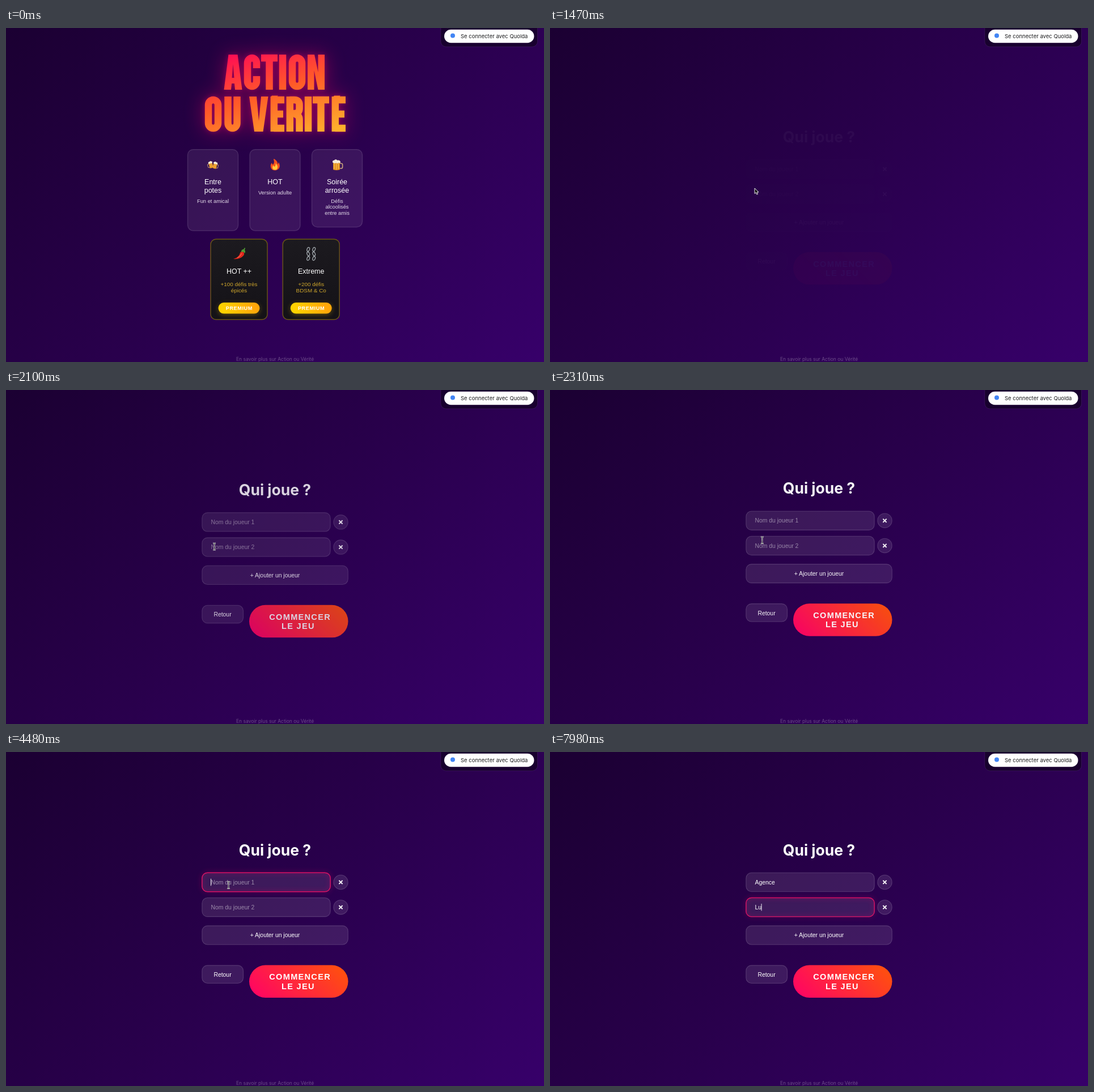
An HTML page that plays this animation: 949x590 px, repeating every 8000 ms.

```html
<!DOCTYPE html>
<html lang="fr">
<head>
<meta charset="utf-8">
<title>Action ou Vérité</title>
<style>
html, body { margin: 0; width: 100%; height: 100%; overflow: hidden; background: #29004c; }
svg { display: block; width: 949px; height: 590px; }
text { font-family: "Liberation Sans", Arial, sans-serif; fill: #fff; text-anchor: middle; white-space: pre; }
.ui { font-family: Inter, "Open Sans", sans-serif; }
.start { text-anchor: start; }
.bold { font-weight: 700; }
.soft { fill: #e2dae8; }
.gold { fill: #cda52c; }
.hint { fill: #9d8cab; }
.card { fill: #ffffff14; stroke: #ffffff24; stroke-width: 1.3; }
.field { fill: #ffffff1a; stroke: #ffffff2b; stroke-width: 1.1; }
.premium { fill: url(#black); stroke: #6b5814; stroke-width: 1.4; }
.line { fill: none; stroke: #fff; stroke-width: 12.5; }
.glow { filter: drop-shadow(0 0 5px #ff006655) drop-shadow(0 0 17px #ff006673); }
.pill { filter: drop-shadow(0 2px 4px #ffc80040); }
.focus { fill: none; stroke: #d80f62; stroke-width: 1.4; filter: drop-shadow(0 0 4px #ff006699); }
</style>
</head>
<body>
<svg id="stage" viewBox="0 0 949 590"></svg>
<script>
const LOOP = 8000, STEP = 70;
const stage = document.getElementById('stage');

const text = (x, y, s, size, cls = '', extra = '') =>
  `<text x="${x}" y="${y}" font-size="${size}" class="${cls}" ${extra}>${s}</text>`;
const box = (x, y, w, h, r, cls, extra = '') =>
  `<rect x="${x}" y="${y}" width="${w}" height="${h}" rx="${r}" class="${cls}" ${extra}/>`;
const path = (d, fill, extra = '') => `<path d="${d}" fill="${fill}" ${extra}/>`;
const place = (x, y, body, more = '') => `<g transform="translate(${x} ${y}) ${more}">${body}</g>`;
const gradient = (id, x1, y1, x2, y2, stops, extra = '') =>
  `<linearGradient id="${id}" gradientUnits="userSpaceOnUse" x1="${x1}" y1="${y1}" x2="${x2}" y2="${y2}" ${extra}>` +
  stops.map(([o, c]) => `<stop offset="${o}" stop-color="${c}"/>`).join('') + '</linearGradient>';

// Condensed display capitals, 62 px high
const solid = {
  A: 'M0 62 8 0H24L32 62H19.5L18.4 51H13.6L12.5 62ZM14 41H18L16 17Z',
  N: 'M0 0H12L18.5 31V0H30V62H18.5L11.5 28V62H0Z',
  V: 'M0 0H13L17 43 21 0H33.5L24.5 62H9Z',
};
const stroked = {
  C: 'M22.5 24V15a8 9 0 0 0-16 0v32a8 9 0 0 0 16 0V38',
  T: 'M0 6H29M14.5 0V62',
  I: 'M6.5 0V62',
  O: 'M6.5 15a8.5 9 0 0 1 17 0v32a8.5 9 0 0 1-17 0z',
  U: 'M6.5 0V47a8 9 0 0 0 16 0V0',
  E: 'M6.3 0V62M6 6H24.5M6 31H22.5M6 56H24.5',
  R: 'M6.3 0V62M6 6h8q9 0 9 9v6q0 9-9 9H6M14 31q9 1 9 10v21',
};
const letters = (y, word, xs) => [...word].map((c, i) => place(xs[i], y,
  solid[c] ? path(solid[c], '#fff', 'fill-rule="evenodd"') : `<path class="line" d="${stroked[c]}"/>`)).join('');

const mug =
  path('M5-3h3.5q2.5 0 2.5 2.5V4q0 2.5-2.5 2.5H5', 'none', 'stroke="#c9a27c" stroke-width="1.8"') +
  path('M-7-6H6V9Q-.5 11-7 9Z', '#e08a1c') +
  path('M-5-3v11M-1-3v12M3-3v11', 'none', 'stroke="#f7bd4a" stroke-width="1.7"') +
  path('M-8-5q-1-4 3-4 3-3 6 0 6-1 6 4-1 2-4 1-2 2-4 0-3 2-7-1Z', '#f6ecd8');
const flame =
  path('M-1-11Q6-6 5-1 7-2 7-5q4 7 1 12-3 4-8 4-6 0-8-5-2-6 2-10 0 3 2 4 4-4 1-11Z', '#f4511e') +
  path('M1-3q5 5 4 9-1 4-5 4-5 0-5-5 0-2 2-4 0 2 2 3 3-2 2-7Z', '#ffc93c');
const pepper =
  path('M6-5q5 4 2 8-6 7-18 6 8-2 11-8 1-5 5-6Z', '#e0281c') +
  path('M5-1q-3 6-8 8', 'none', 'stroke="#ff7a5c" stroke-width="1"') +
  path('M4-4q0-4 4-4l2-3 1 1-1 3q2 3 0 6-2-4-6-2Z', '#4f9a34');
const links = [-5, 5].map(x => [-8, 0, 8].map(y =>
  `<ellipse cx="${x}" cy="${y}" rx="2.2" ry="3.6" transform="rotate(${y ? 20 : -20} ${x} ${y})"/>`).join('') +
  `<path d="M${x} -5.500v3M${x} 2.500v3"/>`).join('');
const chains = `<g fill="none" stroke="#9da3a8" stroke-width="1.3">${links}</g>`;

const card = (x, h, icon, title, lines) => {
  const c = x + 44.5, first = 276 + 14.5 * (title.length - 1) + 18;
  return box(x, 214.6, 89, h, 9.5, 'card') + place(c, 241.5, icon) +
    title.map((s, i) => text(c, 276 + 14.5 * i, s, 12.48)).join('') +
    lines.map((s, i) => text(c, first + 10.7 * i, s, 9.36, 'soft')).join('');
};
const premiumCard = (x, icon, title, lines) => {
  const c = x + 50;
  return box(x, 373, 100, 142, 9.5, 'premium') + place(c, 399, icon) + text(c, 434, title, 12.48) +
    lines.map((s, i) => text(c, 455.5 + 11.4 * i, s, 9.88, 'gold')).join('') +
    place(c, 494.8, '<g class="pill">' + box(-36.5, -9.7, 73, 19.4, 9.7, '', 'fill="url(#gold)"') +
      text(.3, 3.3, 'PREMIUM', 9.1, 'bold', 'letter-spacing=".6"') + '</g>');
};
const field = (n, y) =>
  box(345.8, y, 226.4, 33.4, 9.6, 'field') +
  box(345.8, y, 226.4, 33.4, 9.6, 'focus', `id="focus${n}"`) +
  text(361.5, y + 20.3, `Nom du joueur ${n}`, 10.4, 'hint start', `id="hint${n}"`) +
  text(361.5, y + 20.3, '', 10.4, 'start', `id="typed${n}"`) +
  box(361, y + 10.5, .9, 12.5, 0, '', `id="caret${n}" fill="#fff"`) +
  `<circle cx="590.5" cy="${y + 16.7}" r="12.7" class="field"/>` +
  path(`M587.400 ${y + 13.6}l6.200 6.200m0-6.200l-6.200 6.200`, 'none', 'stroke="#fff" stroke-width="1.9"');

const outline = 'stroke="#111" stroke-width=".8" stroke-linejoin="round"';
const cursors = {
  arrow: path('M0 0V9.500L2.200 7.500 3.800 11 5.500 10.300 4 7H7Z', '#111', 'stroke="#fff" stroke-width=".9"'),
  hand: path('M-1 1q1-2 2 0v4l4 1q2 .5 1.500 3L6 12H0L-3 8q-1-2 2-1Z', '#fff', outline),
  beam: path('M-2.500-6Q0-6 0-4.500 0-6 2.500-6M0-5V5M-2.500 6Q0 6 0 4.500 0 6 2.500 6M-1 2H1', 'none', 'stroke="#fff" stroke-width="2"') +
    path('M-2.500-6Q0-6 0-4.500 0-6 2.500-6M0-5V5M-2.500 6Q0 6 0 4.500 0 6 2.500 6M-1 2H1', 'none', 'stroke="#222" stroke-width=".8"'),
};

stage.innerHTML = `<defs>
  ${gradient('night', 90, -90, 859, 680, [[0, '#1b0032'], [.5, '#29004c'], [1, '#37006a']])}
  ${gradient('sunset', 378, 57, 437, 229, [[0, '#ff1053'], [.45, '#ff5a28'], [1, '#ffb02c']])}
  ${gradient('gold', -24, 9.7, 24, -9.7, [[0, '#ffd200'], [1, '#ffa70a']])}
  ${gradient('black', 0, 373, 0, 515, [[0, '#1c1a1f'], [1, '#141217']])}
  ${gradient('fire', 458, 463, 574, 347, [[0, '#ff0068'], [1, '#ff5508']])}
  <mask id="logo" maskUnits="userSpaceOnUse" x="330" y="30" width="290" height="170">
    ${letters(47, 'ACTION', [384.500, 419.500, 450, 481.500, 498.500, 532])}
    ${letters(121, 'OUVERITE', [350.500, 385, 429, 466.500, 494.500, 526.500, 541, 574.500])}
    ${path('M467 121.500l2-2h11l-2 2zM577 121.500l2-2h11l-2 2z', '#fff')}
  </mask></defs>
  <rect width="949" height="590" fill="url(#night)"/>
  ${box(767, -12, 170.5, 45, 9, '', 'fill="#16002a" fill-opacity=".85" stroke="#ffffff14"')}
  ${box(773, 2.800, 158.500, 23.500, 11.750, '', 'fill="#fff"')}
  <circle cx="788" cy="13.500" r="4" fill="#4285f4"/>
  ${text(802, 17.600, 'Se connecter avec Quolda', 9.500, 'ui start', 'style="fill:#1d1d1f"')}
  ${text(474.500, 588.300, 'En savoir plus sur Action ou Vérité', 8.500, 'ui', 'fill-opacity=".3"')}
  <g id="menu">
    <g class="glow" role="img" aria-label="ACTION OU VÉRITÉ"><rect x="330" y="30" width="290" height="170" fill="url(#sunset)" mask="url(#logo)"/></g>
    ${card(320.500, 143.500, place(-4, 0, mug, 'rotate(-14) scale(-.5 .62)') + place(4, 1, mug, 'rotate(14) scale(.5 .62)'), ['Entre', 'potes'], ['Fun et amical'])}
    ${card(430, 143.500, place(0, 0, flame, 'scale(.9)'), ['HOT'], ['Version adulte'])}
    ${card(539.500, 137, place(-.5, .5, mug, 'scale(.92)'), ['Soirée', 'arrosée'], ['Défis', 'alcoolisés', 'entre amis'])}
    ${premiumCard(361, pepper, 'HOT ++', ['+100 défis très', 'épicés'])}
    ${premiumCard(488.200, chains, 'Extreme', ['+200 défis', 'BDSM &amp; Co'])}
  </g>
  <g id="players">
    ${text(474.500, 182.500, 'Qui joue ?', 26.500, 'ui bold')}
    ${field(1, 213.300)}${field(2, 257.500)}
    <circle id="ring" cx="590.5" cy="230" r="13.600" fill="none" stroke="#fff" stroke-width="1.300"/>
    ${box(345.800, 306.900, 257.500, 33.300, 9.600, 'field')}${text(474.500, 327.200, '+ Ajouter un joueur', 10.400)}
    ${box(345.800, 376.900, 72.700, 31.600, 9.600, 'field')}${text(382, 396.900, 'Retour', 10.400)}
    ${box(429, 376.500, 174.500, 57.500, 28.700, '', 'fill="url(#fire)"')}
    ${text(464.300, 402.300, 'COMMENCER', 14.560, 'bold start', 'letter-spacing="1.3"')}
    ${text(486, 418.700, 'LE JEU', 14.560, 'bold start', 'letter-spacing="1.3"')}
  </g>
  <g id="cursor">${Object.entries(cursors).map(([k, v]) => `<g id="${k}">${v}</g>`).join('')}</g>`;

const $ = id => document.getElementById(id);
const show = (id, on) => $(id).style.display = on ? '' : 'none';
const clamp = v => Math.min(1, Math.max(0, v));
const pills = document.querySelectorAll('.pill');

// Time, x, y of the pointer's hot spot
const route = [[70, 908, 13], [280, 540, 230], [420, 470, 250], [700, 322, 290], [1050, 338, 284],
  [1470, 361, 283], [2100, 367.5, 276.5], [2870, 392.5, 235]];
function pointer(t) {
  const i = route.findIndex(p => p[0] > t);
  if (i < 1) return route[i < 0 ? route.length - 1 : 0].slice(1);
  const [t0, x0, y0] = route[i - 1], [t1, x1, y1] = route[i];
  const k = (t - t0) / (t1 - t0);
  return [x0 + (x1 - x0) * k, y0 + (y1 - y0) * k];
}

const inputs = [
  { word: 'Agence', keys: [5670, 6020, 6090, 6230, 6370, 6510], from: 4410, to: 6650 },
  { word: 'Lu', keys: [7700, 7980], from: 7280, to: LOOP },
];

function drawInput({ word, keys, from, to }, n, t) {
  const count = keys.filter(k => k <= t).length;
  const focused = t >= from && t < to;
  const typed = $('typed' + n);
  typed.textContent = word.slice(0, count);
  show('hint' + n, !count);
  show('focus' + n, focused);
  $('focus' + n).style.opacity = n === 1 && t < from + STEP ? .5 : 1;
  const since = t - (count ? keys[count - 1] : from);
  show('caret' + n, focused && since % 1120 < 560);
  $('caret' + n).setAttribute('x', 361 + (count ? typed.getComputedTextLength() : 0));
}

function draw(t) {
  const pulse = (1 - Math.cos(t * Math.PI / 1000)) / 2;
  for (const p of pills) {
    p.setAttribute('transform', `scale(${1 + .05 * pulse})`);
    p.style.filter = `brightness(${1 + .16 * pulse}) drop-shadow(0 2px ${4 + 2 * pulse}px #ffc80050)`;
  }
  $('sunset').setAttribute('gradientTransform', `translate(0 ${-5 * pulse})`);

  $('menu').style.opacity = 1 - clamp((t - 1190) / 240);
  const enter = 1 - (1 - clamp((t - 1450) / 1000)) ** 1.7;
  $('players').style.opacity = enter;
  $('players').setAttribute('transform', `translate(0 ${20 * (1 - enter)})`);
  inputs.forEach((input, i) => drawInput(input, i + 1, t));
  show('ring', t >= 6650 && t < 7280);

  show('cursor', t >= 70 && t < 5670);
  $('cursor').setAttribute('transform', `translate(${pointer(t).join(' ')})`);
  const kind = t >= 1960 ? 'beam' : t >= 420 && t < 1400 ? 'hand' : 'arrow';
  for (const k in cursors) show(k, k === kind);
}

const origin = performance.now();
function tick() {
  const t = (performance.now() - origin) % LOOP;
  draw(Math.floor(t / STEP) * STEP);
  requestAnimationFrame(tick);
}
tick();
</script>
</body>
</html>
```
